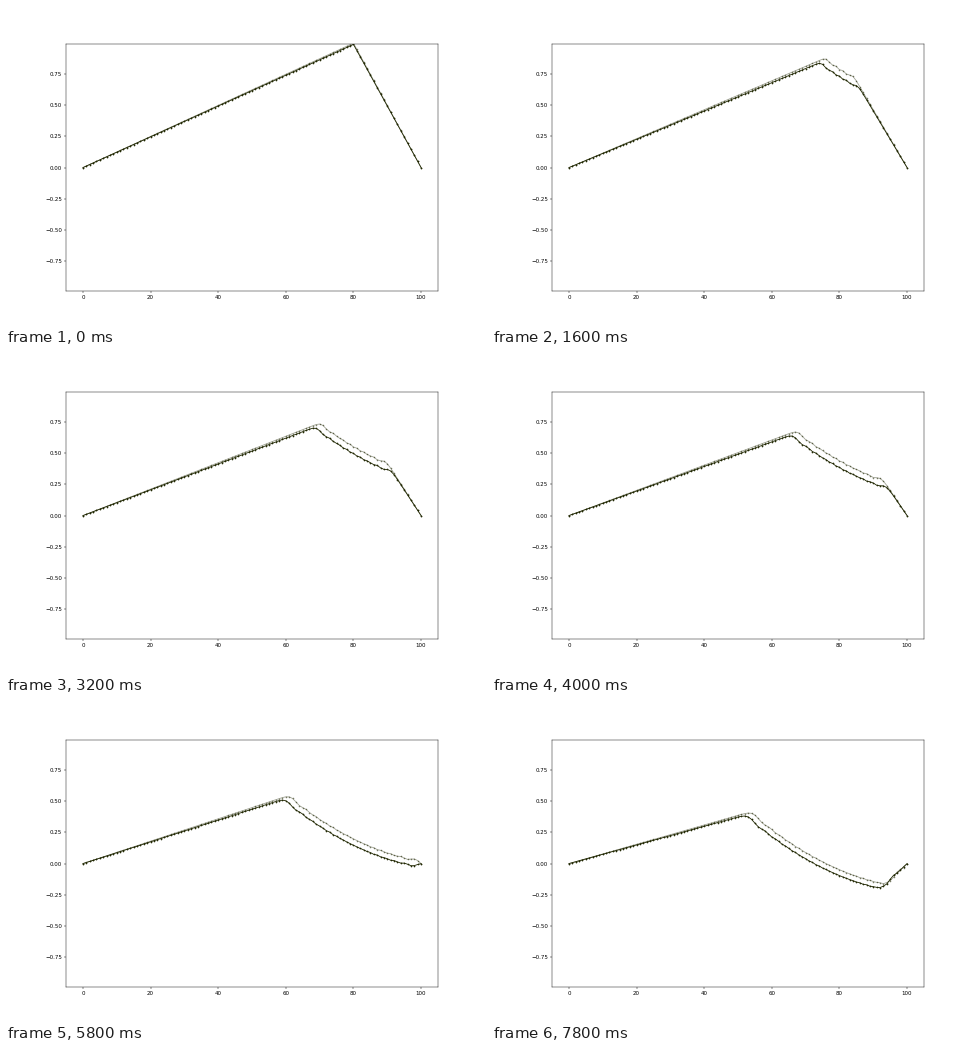
A matplotlib script that plays this animation: 480 by 320 pixels, repeating every 8000 ms.

```python
import numpy as np
import matplotlib.pyplot as plt
from matplotlib.animation import FuncAnimation

N = 101          # points on the string
FRAMES = 40
R2 = 0.5         # squared Courant number
PLUCK = 80       # where the string is pulled up
INK = "#1f2600"


def simulate(steps):
    """Leapfrog solution of the wave equation with fixed ends."""
    x = np.arange(N)
    start = np.where(x <= PLUCK, x / PLUCK, (N - 1 - x) / (N - 1 - PLUCK))
    states = [start, 0.99 * start]
    while len(states) < steps:
        old, now = states[-2:]
        new = np.zeros(N)
        bend = now[2:] - 2 * now[1:-1] + now[:-2]
        new[1:-1] = 2 * now[1:-1] - old[1:-1] + R2 * bend
        states.append(new)
    return x, states


x, states = simulate(FRAMES + 1)

fig, ax = plt.subplots(figsize=(12, 8), dpi=40)
ax.set_xlim(-5, 105)
top = states[1].max()
ax.set_ylim(-top, top)

style = dict(color=INK, marker=".", markersize=4, linewidth=1.5)
trail, = ax.plot(x, states[0], alpha=0.42, **style)
string, = ax.plot(x, states[1], **style)


def update(k):
    trail.set_ydata(states[max(k - 1, 0)])
    string.set_ydata(states[k + 1])
    return trail, string


anim = FuncAnimation(fig, update, frames=FRAMES, interval=200,
                     repeat=True, repeat_delay=0)
plt.show()
```
